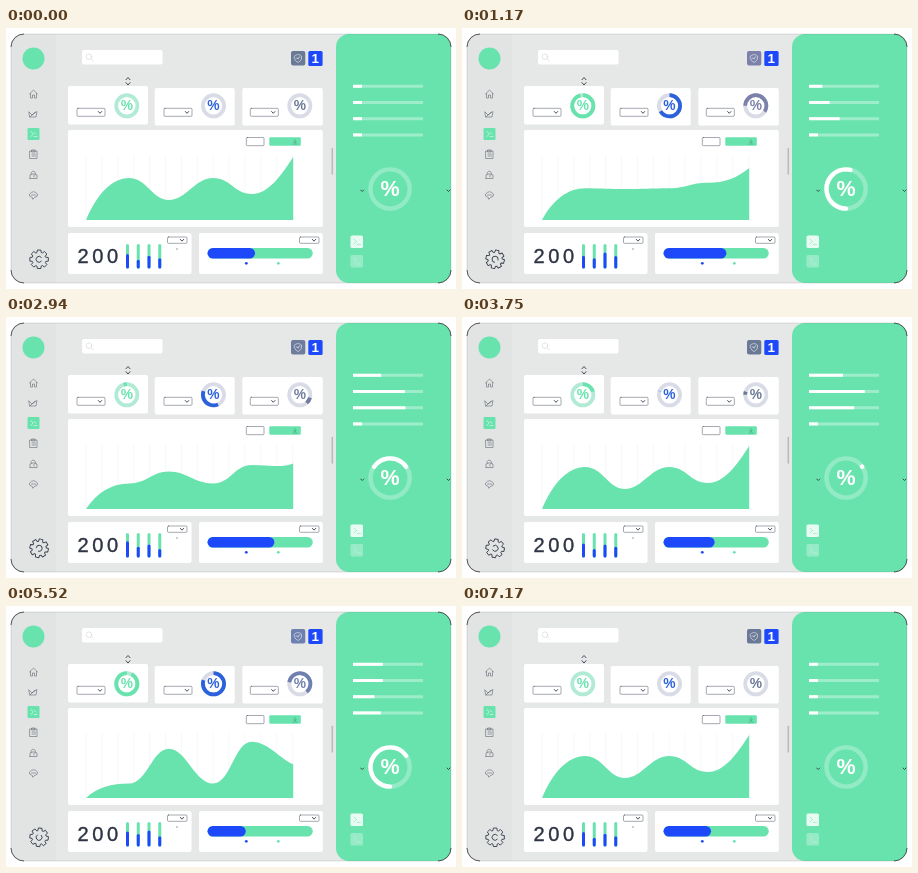
Write an HTML page that moves like this. It is 450 px wide and 261 px high and loops after 7.23 s.

```html
<!DOCTYPE html>
<html lang="en">
<head>
<meta charset="utf-8">
<title>Dashboard</title>
<style>
  html, body { margin: 0; width: 100%; height: 100%; overflow: hidden; background: #fff; }
  svg { display: block; width: 100vw; height: 100vh; }
  text { font-family: "Liberation Sans", Arial, sans-serif; text-anchor: middle; }
  .line { fill: none; stroke: #4a505c; stroke-width: .5; stroke-linejoin: round; stroke-linecap: round; }
  .strong { stroke: #343a48; stroke-width: .9; }
  .card { fill: #fff; }
</style>
</head>
<body>
<svg id="stage" viewBox="0 0 450 261" xmlns="http://www.w3.org/2000/svg">
  <defs><clipPath id="frame"><rect x="5" y="6" width="440" height="249" rx="13"/></clipPath></defs>
  <g clip-path="url(#frame)">
    <path fill="#e6e8e8" d="M5 6H445V255H5z"/>
    <path fill="#e2e4e4" d="M5 6H50V255H5z"/>
    <rect x="330" y="6" width="115" height="249" rx="13" fill="#69e3ae"/>
  </g>
  <rect x="5" y="6" width="440" height="249" rx="13" fill="none" stroke="#222" stroke-width=".5" opacity=".25"/>
  <path fill="none" stroke="#222" stroke-width=".7"
    d="M5 19A13 13 0 0 1 18 6M432 6A13 13 0 0 1 445 19M445 242A13 13 0 0 1 432 255M18 255A13 13 0 0 1 5 242"/>

  <!-- sidebar -->
  <circle cx="27.5" cy="30.5" r="11" fill="#69e3ae"/>
  <rect x="21.5" y="100" width="12" height="12" rx="1" fill="#69e3ae"/>
  <g class="line">
    <path d="M23.5 66L27.5 62L31.5 66M24.5 65.5V70H26.5V67H28.5V70H30.5V65.5"/>
    <path d="M23 84L26 87L31 83.5L30 89H24zM24 89L29 84"/>
    <path stroke="#fff" d="M25 103.5L27 106L25 108.5M28 108.5H31M28 104.5L30 106"/>
    <path d="M24 123H31V130.5H24zM26 122H29V124H26zM26 126H29.5M26 128H29.5"/>
    <path d="M25 146A2.3 2.3 0 1 1 29.5 146M24 150V147Q27.5 144.5 31 147V150.5H24zM28 147V149"/>
    <path d="M26 169.5Q22.5 168.5 23.5 166Q27.5 161.5 31.5 166Q32 169 28.5 169.5L27 171zM25.5 167H29.5"/>
  </g>
  <g id="gear"></g>

  <!-- top bar -->
  <rect class="card" x="76" y="22" width="80.5" height="14.5" rx="2"/>
  <g class="line" style="stroke:#c8ccd2"><circle cx="83" cy="28.7" r="2.8"/><path d="M85.2 30.8L87.5 33"/></g>
  <rect id="badge" x="285" y="23" width="14.3" height="14.5" rx="2"/>
  <path class="line" style="stroke:#fff" d="M288.5 28Q292 25 295.5 28V31Q294.5 33.5 292 34.5Q289.5 33.5 288.5 31zM290 30H291.3L292 31.3L293 29H294"/>
  <rect x="302.3" y="23" width="14.3" height="15" rx="1.5" fill="#1d49fa"/>
  <text x="309.2" y="35.2" font-size="13.5" font-weight="bold" fill="#fff">1</text>
  <path class="line strong" d="M120 51.7L122 49.5L124 51.7M120 54.7L122 57L124 54.7"/>

  <!-- cards -->
  <g class="card">
    <rect x="62" y="58" width="80" height="38.5" rx="2"/>
    <rect x="148.7" y="60" width="80" height="37.5" rx="2"/>
    <rect x="236.3" y="60" width="80.5" height="37.5" rx="2"/>
    <rect x="62" y="102" width="254.8" height="97" rx="2"/>
    <rect x="62" y="205" width="123.5" height="41" rx="2"/>
    <rect x="193" y="205" width="123.8" height="41" rx="2"/>
  </g>
  <g id="grid" stroke="#f4f5f5" stroke-width=".7"></g>
  <path id="area" fill="#69e3ae"/>
  <rect class="line" x="240.3" y="109.5" width="17.7" height="8.2" rx="1"/>
  <rect x="263.3" y="109.3" width="31.5" height="8.5" rx="1" fill="#69e3ae"/>
  <path class="line" style="stroke:#3d8f70" d="M289 111.5V114.5M287.8 113.5L289 114.8L290.2 113.5M287 116H291"/>
  <g id="selects"></g>

  <text x="93.6" y="234.8" font-size="20" letter-spacing="3.6" fill="#2d3443" stroke="#2d3443" stroke-width=".4">200</text>
  <path stroke="#777" stroke-width=".7" d="M170 221H172"/>
  <g id="bars" stroke-width="3" stroke-linecap="round"></g>
  <g stroke-width="10.5" stroke-linecap="round">
    <path stroke="#69e3ae" d="M206.8 225.3H301.5"/>
    <path id="progress" stroke="#1d49fa"/>
  </g>
  <circle cx="240.3" cy="235.3" r="1.4" fill="#1d49fa"/>
  <circle cx="272.3" cy="235.3" r="1.4" fill="#69e3ae"/>
  <path stroke="#b8bbbd" stroke-width="1.6" stroke-linecap="round" d="M326.3 120.5V146"/>

  <!-- side panel -->
  <g id="sliders" stroke="#fff" stroke-width="3"></g>
  <path class="line strong" d="M354.7 162L356.2 163.5L357.7 162M441 162L442.5 163.5L444 162"/>
  <rect x="344.5" y="207.5" width="12.5" height="12.5" rx="1.5" fill="#fff" opacity=".85"/>
  <rect x="344.5" y="227" width="12.5" height="12.5" rx="1.5" fill="#fff" opacity=".3"/>
  <path class="line" style="stroke:#69e3ae" d="M348 211L350.5 213.5L348 216M351.5 216.5H354.5"/>
  <path class="line" style="stroke:#c9f5e2" d="M348 230.5L350.5 233L348 235.5M351.5 236H354.5"/>
  <g id="rings" fill="none"></g>
</svg>

<script>
const LOOP = 7230, END = 7170, STEP = 30;
const GREEN = '#69e3ae', BLUE = '#1d49fa';
const find = id => document.getElementById(id);

function add(parent, tag, attrs, text = '') {
  const node = document.createElementNS('http://www.w3.org/2000/svg', tag);
  for (const name in attrs) node.setAttribute(name, attrs[name]);
  node.textContent = text;
  return parent.appendChild(node);
}

const mix = (a, b, p) => a + (b - a) * p;

// Eased 0 to 1 between two times
function ramp(t, from, to) {
  const p = Math.min(1, Math.max(0, (t - from) / (to - from)));
  return p * p * (3 - 2 * p);
}

// Eased rise to 1 at the top, then back to 0
const bump = (t, start, top, end) => ramp(t, start, top) - ramp(t, top, end);

// Static repeats
for (let i = 0; i < 14; i++) add(find('grid'), 'path', { d: `M${80 + i * 15.9} 127V192` });

function select(x, y, width, height) {
  const cx = x + width - 5, cy = y + height / 2;
  add(find('selects'), 'rect', { class: 'line', x, y, width, height, rx: 1 });
  add(find('selects'), 'path', { class: 'line strong', d: `M${cx - 1.7} ${cy - .8}l1.7 1.8l1.7 -1.8` });
}
[71, 158, 244.3].forEach(x => select(x, 80.3, 28, 8));
[161.5, 293.5].forEach(x => select(x, 209, 19.5, 6.3));

// Gear: eight teeth, four corners each
const corners = Array.from({ length: 32 }, (_, i) => {
  const tip = i % 4 === 1 || i % 4 === 2;
  const side = i % 4 < 2 ? -1 : 1;
  const angle = Math.floor(i / 4) * Math.PI / 4 + side * (tip ? .19 : .3);
  const r = tip ? 9.4 : 7.1;
  return `${(r * Math.cos(angle)).toFixed(2)} ${(r * Math.sin(angle)).toFixed(2)}`;
});
add(find('gear'), 'path', { class: 'line strong', d: `M${corners.join('L')}z` });
add(find('gear'), 'path', { class: 'line strong', d: 'M2.2 -2A3 3 0 1 0 2.2 2' });

// Each ring is swept twice per loop; the second sweep begins at restart
const rings = [
  { x: 120.8, y: 77.8, r: 10.6, width: 3.8, size: 13.8, color: GREEN, track: '#b2ebd5',
    from: 0, sweep: 360, restart: 3300 },
  { x: 207.5, y: 77.8, r: 10.6, width: 3.8, size: 13.8, color: '#2b62dc', track: '#d9dce6',
    from: 0, sweep: 290, restart: 4000 },
  { x: 293.8, y: 77.8, r: 10.6, width: 3.8, size: 13.8, tinted: true, track: '#d9dce6',
    from: 270, sweep: 230, restart: 3500 },
  { x: 384.1, y: 161, r: 19.6, width: 4.4, size: 21.5, color: '#fff', track: '#93ebc5', cap: 'round',
    from: 180, sweep: 235, restart: 4000 }
];
for (const ring of rings) {
  const circle = { cx: ring.x, cy: ring.y, r: ring.r, 'stroke-width': ring.width };
  add(find('rings'), 'circle', { ...circle, stroke: ring.track });
  ring.arc = add(find('rings'), 'circle', { ...circle, stroke: ring.color, pathLength: 360,
    'stroke-linecap': ring.cap || 'butt' });
  ring.label = add(find('rings'), 'text', { x: ring.x, y: ring.y + ring.size * .34,
    'font-size': ring.size, 'font-weight': 'bold', fill: ring.color }, '%');
}

const sliders = [
  { start: 0, top: 4700, gain: 28 },
  { start: 0, top: 3600, gain: 47 },
  { start: 0, top: 2400, gain: 45 },
  { start: 3750, top: 4900, gain: 23 }
];
sliders.forEach((slider, i) => {
  slider.y = 58.3 + i * 16.2;
  add(find('sliders'), 'path', { d: `M347 ${slider.y}H417`, opacity: .35 });
  slider.fill = add(find('sliders'), 'path', {});
});

const bars = Array.from({ length: 4 }, (_, i) => {
  const x = 121.5 + i * 10.75;
  add(find('bars'), 'path', { d: `M${x} 217.5V239`, stroke: GREEN });
  return { x, fill: add(find('bars'), 'path', { stroke: BLUE }) };
});

function areaPath(p) {
  const y = (a, b) => mix(a, b, p).toFixed(2);
  const [y1, y2, y3, y4] = [y(150, 179), y(172, 141), y(150, 179), y(166, 134)];
  return `M80 192C91 ${y(166, 182)} 106 ${y1} 123 ${y1}` +
    `C141 ${y1} 146 ${y2} 163 ${y2}S189 ${y3} 207 ${y3}S228 ${y4} 246 ${y4}` +
    `C262 ${y4} 275 ${y(148, 154)} 287.2 ${y(129, 160)}V192z`;
}

function chartPhase(t) {
  const half = t % (LOOP / 2);
  return ramp(half, 530, 2130) - ramp(half, 2420, 3560);
}

function drawRing({ x, y, from, sweep, restart, tinted, arc, label }, t, tint) {
  const phase = t < restart ? t / restart : (t - restart) / (END - restart);
  const head = ramp(phase, 0, .4), tail = ramp(phase, .5, .95);
  const length = (head - tail) * sweep;
  arc.setAttribute('visibility', length > .5 ? 'visible' : 'hidden');
  arc.setAttribute('stroke-dasharray', `${length} 360`);
  arc.setAttribute('transform', `rotate(${from + tail * sweep - 90} ${x} ${y})`);
  if (tinted) {
    arc.setAttribute('stroke', tint);
    label.setAttribute('fill', tint);
  }
}

function draw(t) {
  find('area').setAttribute('d', areaPath(chartPhase(t)));

  const lavender = bump(t, 0, 1600, 3700) + bump(t, 3750, 4700, 6200);
  const azure = bump(t, 5000, 6350, END);
  const tint = `hsl(${219 + 16 * lavender - 8 * azure} ${17 + 6 * lavender + 29 * azure}% ${50 + 9 * lavender + 6 * azure}%)`;
  find('badge').setAttribute('fill', tint);
  rings.forEach(ring => drawRing(ring, t, tint));

  for (const { start, top, gain, y, fill } of sliders) {
    fill.setAttribute('d', `M347 ${y}H${356 + gain * bump(t, start, top, END)}`);
  }
  bars.forEach(({ x, fill }, i) => {
    const level = 226 + 4 * (i % 2) + 2 * Math.sin(4 * Math.PI * t / END + i);
    fill.setAttribute('d', `M${x} ${level + 1.5}V239`);
  });
  const end = 249 + 28 * bump(t, 0, 2200, 4200) - 10 * bump(t, 3700, 5200, END);
  find('progress').setAttribute('d', `M206.8 225.3H${end - 5.2}`);
  find('gear').setAttribute('transform', `translate(33.1 231.3) rotate(${t / END * 360})`);
}

const origin = performance.now();
function tick() {
  const t = (performance.now() - origin) % LOOP;
  draw(Math.min(END, Math.floor(t / STEP) * STEP));
  requestAnimationFrame(tick);
}
tick();
</script>
</body>
</html>
```
